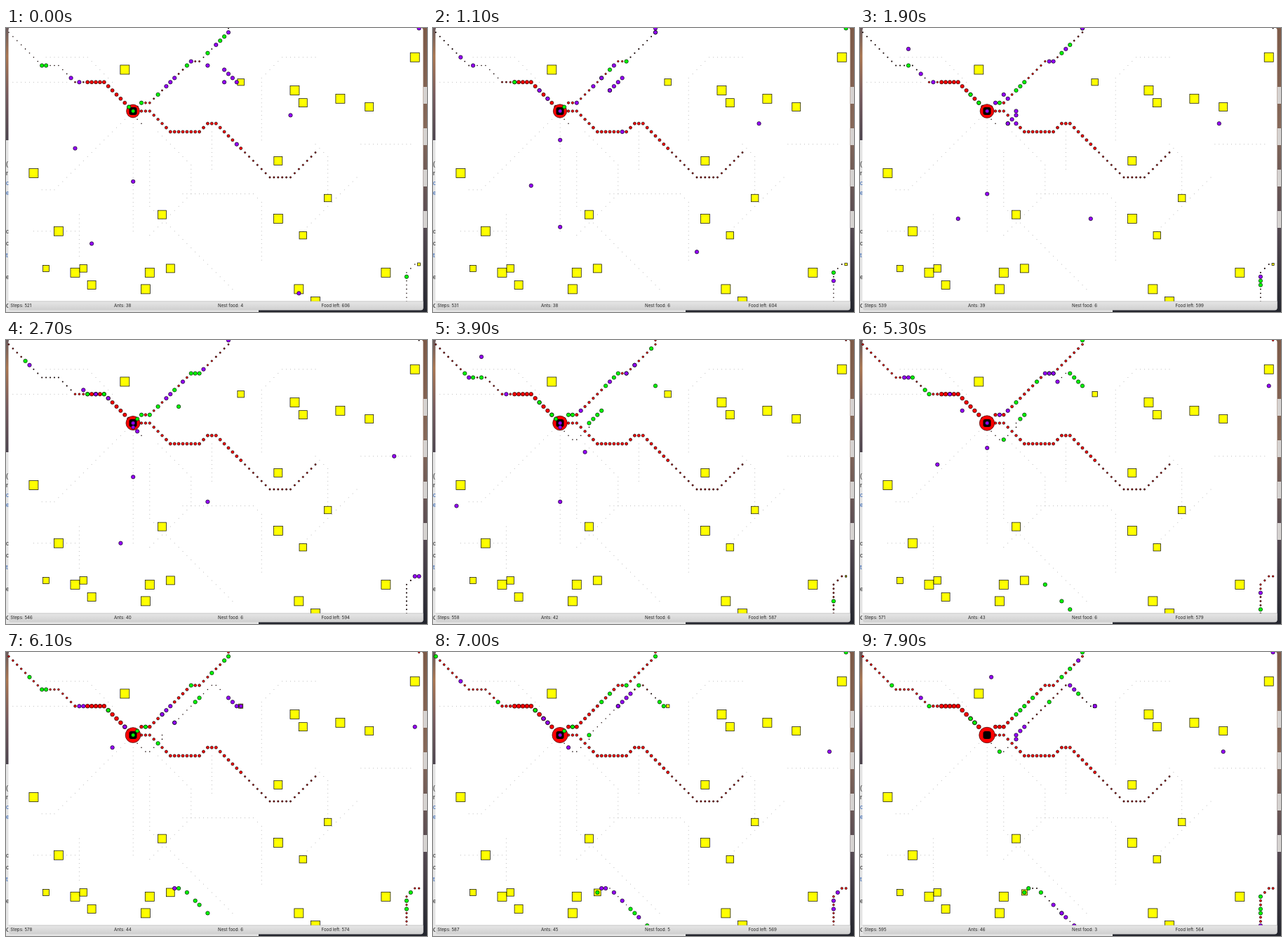
Recreate the animation shown at these times as an HTML page. Size 600x405 px, loop 8 s.

```html
<!DOCTYPE html>
<html lang="en">
<head>
<meta charset="utf-8">
<title>Ant colony</title>
<style>
  html, body { margin: 0; width: 100%; height: 100%; overflow: hidden; background: #fff; }
  svg { display: block; width: 600px; height: 405px; }
  .status { font: 6.2px Inter, "Liberation Sans", sans-serif; fill: #222; }
  .page { font: 9px "Liberation Sans", Arial, sans-serif; fill: #222; }
  .link { fill: #2a5db0; }
</style>
</head>
<body>
<svg viewBox="0 0 600 405">
  <defs>
    <linearGradient id="left" x2="0" y2="1">
      <stop offset="0" stop-color="#6a5a5c"/><stop offset=".25" stop-color="#a87550"/>
      <stop offset=".6" stop-color="#75595c"/><stop offset="1" stop-color="#4a424c"/>
    </linearGradient>
    <linearGradient id="right" x2="0" y2="1">
      <stop offset="0" stop-color="#7d5a48"/><stop offset=".35" stop-color="#86695a"/>
      <stop offset=".7" stop-color="#554a52"/><stop offset="1" stop-color="#24262e"/>
    </linearGradient>
    <linearGradient id="bar" x2="0" y2="1">
      <stop offset="0" stop-color="#e6e6e6"/><stop offset="1" stop-color="#cfcfcf"/>
    </linearGradient>
  </defs>
  <rect width="600" height="405" fill="#e4e4e4"/>
  <rect width="4" height="160" fill="url(#left)"/>
  <rect x="593" width="7" height="405" fill="url(#right)"/>
  <g id="icons" fill="#d5d2d0"></g>
  <rect x="360" y="401" width="240" height="4" fill="#24262e"/>
  <g class="page" id="page"></g>
  <rect x="3.5" width="591" height="402" rx="3" fill="#fff"/>
  <g id="faint" fill="#a8a8a8"></g>
  <g id="trails" stroke="#000" stroke-width=".65"></g>
  <circle id="nest" cx="181" cy="118.5" fill="#f00" stroke="#300" stroke-width=".7"/>
  <rect x="175.5" y="113" width="11" height="11" rx="3"/>
  <g id="food" fill="#ff0" stroke="#000" stroke-width=".7"></g>
  <g id="ants" stroke="#000" stroke-width=".65"></g>
  <path d="M3.5 390H594.5V399Q594.5 402.5 591 402.5H7Q3.5 402.5 3.5 399Z" fill="url(#bar)"/>
  <path d="M3.5 389.8H594.5" stroke="#b5b5b5" stroke-width=".7"/>
  <g class="status">
    <text id="steps" x="6.3" y="398.2"></text><text id="count" x="154" y="398.2"></text>
    <text id="stored" x="302" y="398.2"></text><text id="remaining" x="449.5" y="398.2"></text>
  </g>
</svg>
<script>
const COLS = 100, ROWS = 70, VISIBLE_ROWS = 66, CELL = 5.905, LAST_STEP = 74;
const NEST = '30,20', GREEN = '#0f0', PURPLE = '#9500ff';
const $ = id => document.getElementById(id);
const mod = (n, m) => (n % m + m) % m;
const px = i => 4 + CELL * mod(i, COLS);
const py = j => 0.4 + CELL * mod(j, ROWS);
const points = text => text.split(' ').map(p => p.split(',').map(Number));
const dot = ([i, j], r, fill = '') => mod(j, ROWS) > VISIBLE_ROWS ? '' :
  `<circle cx="${px(i).toFixed(1)}" cy="${py(j).toFixed(1)}" r="${r.toFixed(2)}" ${fill && `fill="${fill}"`}/>`;
const square = ([i, j], side) =>
  `<rect x="${px(i) - side / 2}" y="${py(j) - side / 2}" width="${side}" height="${side}"/>`;

// Walks cell by cell, diagonally where possible, through the given corners.
function route(text) {
  const [first, ...corners] = points(text);
  const cells = [first];
  for (const [x, y] of corners) {
    let [i, j] = cells[cells.length - 1];
    while (i !== x || j !== y) {
      i += Math.sign(x - i);
      j += Math.sign(y - j);
      cells.push([i, j]);
    }
  }
  return cells;
}

// Ants shuttle between nest and food; `first` holds each one's first departure.
const west = {
  cells: route(NEST + ' 23,13 16,13 12,9 8,9 -4,-3 -4,-11 -2,-13 -1,-13'),
  reach: () => 45,
  first: [-78, -76, -60, -57, -41, -32, -22, -21, -1, 36],
  size: (s, n) => s < 12 ? 2.5 + .06 * n : (s < 15 ? 1 : .65) + .12 * n
};
const north = {
  cells: route(NEST + ' 32,18 34,18 44,8 46,8 53,1 53,-2 42,-13 40,-13 39,-12'),
  reach: d => d < 12 ? 27 : 40,
  first: [-47, -46, -45, -41, -35, -32, -22, -21, -18, -13, -6, -2, 0, 26, 63],
  size: (s, n) => s > 27 ? n && .4 + .07 * n : (s < 5 ? 1.5 : s > 16 ? .8 : 1.1) + .07 * n
};
const loop = {
  cells: route(NEST + ' 30,21 33,24 34,24 37,21 37,20 49,8 50,8 55,13 56,13'),
  reach: () => 28,
  first: [-33, -32, -31, -30, 12, 40, 50],
  size: (s, n, t) => s < 4 || (s < 10 && t > 30) ? .65 : n > 4 ? .1 + .1 * n : 0
};
const east = {
  cells: route(NEST + ' 34,20 39,25 46,25 48,23 50,23 63,36 68,36 74,30'),
  reach: () => 54,
  first: [],
  size: s => s < 8 ? 1.8 : s < 27 ? 2.05 : 1.15
};
const trails = [west, north, loop, east];

// Lone ants heading home: start step, corners, and the trail they take next.
const strays = [
  [0, '68,21 70,23 88,23 105,40 108,40 128,20 130,20'],
  [0, '70,64 70,61 30,21', loop],
  [0, '16,29 16,30 24,38 23,38 23,49 29,49 30,48'],
  [0, '20,52 26,52 30,48', loop],
  [0, '30,37', west],
  [0, '55,28 50,23 48,23 46,25 39,25 34,20'],
  [0, '48,9 43,14 36,14', north],
  [0, '52,13 50,15 35,15', north],
  [13, '6,0'],
  [33, '7,0', loop],
  [39, '98,0 98,24 86,24'],
  [68, '25,0 31,6 31,19']
].map(([start, corners, next]) => {
  const cells = route(corners.includes('130,20') ? corners : `${corners} ${NEST}`);
  if (next) next.first.push(start + cells.length);
  return { start, cells };
});

for (const trail of trails) {
  trail.trips = trail.first.flatMap(d => {
    const trips = [];
    for (; d <= LAST_STEP; d += 2 * trail.reach(d) + 2) {
      const end = trail.reach(d);
      trips.push({ leave: d, end, home: d + 2 * end + 1 });
    }
    return trips;
  });
}

const foods = {
  13: '28,10 69,15 80,17 98,7 6,35 65,46 16,59 33,63'.concat(' 34,59 70,63 74,66 91,59 12,49'),
  12: '87,19 71,18 65,32 37,45 20,62',
  10.5: '71,50 18,58 77,41',
  9: '9,58'
};
const fixedFood = Object.entries(foods).map(([side, cells]) =>
  points(cells).map(cell => square(cell, +side)).join('')).join('');

const oldTrails = ['30,23 30,49', '49,25 49,34', '1,13 14,13', '28,22 12,38 8,39', '6,49 16,49',
  '17,45 17,55', '34,30 34,43 54,63', '36,25 44,33 44,40 34,50', '42,40 59,40 61,42 61,56',
  '61,27 61,12 66,7 74,7', '74,28 77,32 77,41', '71,49 84,36', '85,28 97,28', '9,7 19,7 25,13'];
$('faint').innerHTML = oldTrails.map(text => route(text).map(c => dot(c, .5)).join('')).join('');

$('icons').innerHTML = [0, 1, 2, 3].map(n =>
  `<rect x="595" y="${84 + 59 * n}" width="5" height="24"/>`).join('');
$('page').innerHTML = [['(', 197], ['r', 210], ['c', 224, 1], ['e', 238, 1], ['o', 293],
  ['c', 310], ['t', 327, 1], ['e', 358], ['C', 399]].map(([text, y, link]) =>
  `<text y="${y}" ${link ? 'class="link"' : ''}>${text}</text>`).join('');

// Every ant that carries food home strengthens the cells it has passed.
function drawTrails(t) {
  $('trails').innerHTML = trails.map(({ cells, trips, size }) => cells.map((cell, s) => {
    const passes = trips.filter(({ end, home }) => s <= end && home - s > 0 && home - s <= t).length;
    const r = s && size(s, passes, t);
    if (!r) return '';
    return r < .95
      ? `<g stroke="none">${dot(cell, r + .15, '#100')}</g>`
      : dot(cell, r, r < 1.2 ? '#b00000' : '#f00');
  }).join('')).join('');
}

function drawAnts(t) {
  const layers = { [GREEN]: '', [PURPLE]: '' };
  const add = (cell, color) => layers[color] += cell ? dot(cell, 2.7, color) : '';
  for (const { cells, trips } of trails) {
    for (const { leave, end, home } of trips) {
      if (t - leave <= end) add(cells[t - leave], GREEN);
      else add(cells[home - t], PURPLE);
    }
  }
  for (const { start, cells } of strays) add(cells[t - start], PURPLE);
  $('ants').innerHTML = layers[GREEN] + layers[PURPLE];
}

function draw(t) {
  drawTrails(t);
  drawAnts(t);
  $('nest').setAttribute('r', 9.4 + .025 * t);
  $('food').innerHTML = fixedFood
    + square([56, 13], t < 40 ? 9.5 : Math.max(4.5, 9.5 - (t - 40) / 5))
    + square([39, 58], Math.min(12, 12 - (t - 56) / 4.5))
    + (t < 40 ? square([99, 57], 4 - t / 20) : '');
  $('steps').textContent = `Steps: ${521 + t}`;
  $('count').textContent = `Ants: ${38 + Math.round(Math.max(0, t - 10) / 7.7)}`;
  $('stored').textContent = `Nest food: ${Math.round(6.3 - 3 * ((t - 35) / 39) ** 4)}`;
  $('remaining').textContent = `Food left: ${606 - Math.round(.62 * Math.max(0, t - 6))}`;
}

let shown = -1;
const start = performance.now();
function tick() {
  const frame = Math.floor(Math.max(0, performance.now() - start) % 8000 / 100);
  const step = Math.round(frame * LAST_STEP / 79);
  if (step !== shown) draw(shown = step);
  requestAnimationFrame(tick);
}
tick();
</script>
</body>
</html>
```
